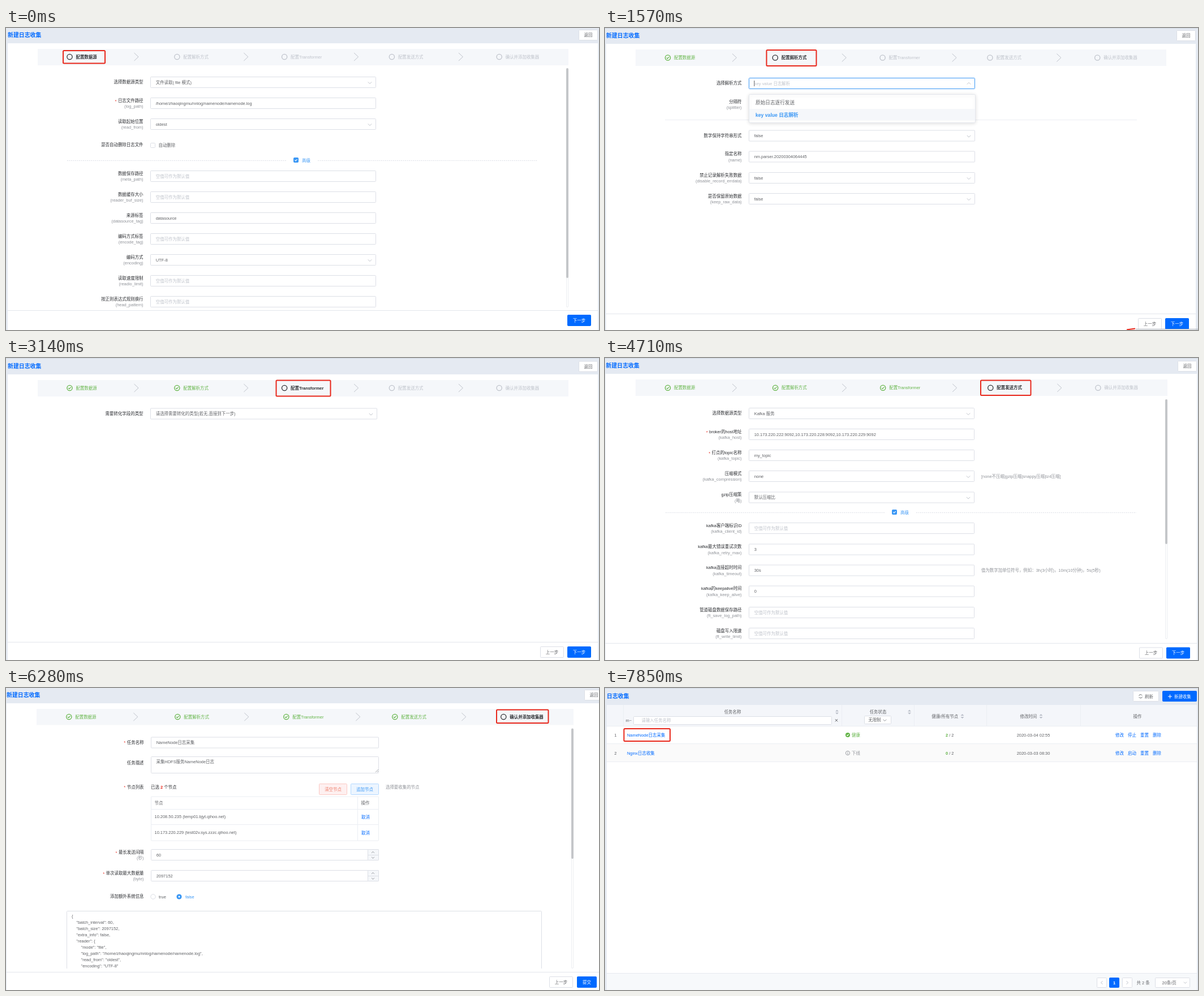
An HTML page with a canvas for the animation above (9.42 s loop, 1048 px wide and 534 px high).

```html
<!DOCTYPE html>
<html lang="zh-CN">
<head>
<meta charset="utf-8">
<title>日志收集</title>
<style>
html, body { margin: 0; width: 100%; height: 100%; overflow: hidden; background: #fff; }
canvas { display: block; width: 1048px; height: 534px; }
</style>
</head>
<body>
<canvas id="stage"></canvas>
<script>
const W = 1048, H = 534, HOLD = 1570;
const canvas = document.getElementById('stage');
const g = canvas.getContext('2d');
const dpr = window.devicePixelRatio || 1;
canvas.width = W * dpr;
canvas.height = H * dpr;

const FONT = '"Liberation Sans", "Noto Sans CJK SC", "Noto Sans CJK", sans-serif';
const C = {
  blue: '#006aff', sky: '#3a97f5', green: '#62b446', red: '#e8271b', ink: '#2b2d31',
  text: '#606266', sub: '#909399', faint: '#bfc3cb', line: '#dcdfe6', soft: '#ebeef3',
  bar: '#f5f7fa', head: '#e5eaf2', top: '#d3d9e3'
};
const EMPTY = '空值可作为默认值';

function text(s, x, y, color = C.text, o = {}) {
  const size = o.size || 7.45;
  g.font = `${o.bold ? 'bold ' : ''}${size}px ${FONT}`;
  g.textAlign = o.align || 'left';
  g.fillStyle = color;
  g.fillText(s, x, y + size * 0.36);
  return g.measureText(s).width;
}

function fill(x0, y0, x1, y1, color) {
  g.fillStyle = color;
  g.fillRect(x0, y0, x1 - x0, y1 - y0);
}

function box(x0, y0, x1, y1, stroke = C.line, bg = '#fff', r = 1) {
  g.beginPath();
  g.roundRect(x0 + 0.5, y0 + 0.5, x1 - x0 - 1, y1 - y0 - 1, r);
  g.fillStyle = bg;
  g.fill();
  g.strokeStyle = stroke;
  g.lineWidth = 1;
  g.stroke();
}

function path(points, color, width = 1) {
  g.beginPath();
  points.forEach(([x, y]) => g.lineTo(x, y));
  g.strokeStyle = color;
  g.lineWidth = width;
  g.stroke();
}

function circle(x, y, r, stroke, width = 1, bg) {
  g.beginPath();
  g.arc(x, y, r, 0, Math.PI * 2);
  if (bg) { g.fillStyle = bg; g.fill(); }
  if (stroke) { g.strokeStyle = stroke; g.lineWidth = width; g.stroke(); }
}

const rule = (x0, x1, y, color = C.soft) => fill(x0, y, x1, y + 1, color);
const tick = (x, y, color, k = 1) =>
  path([[x - 2.3 * k, y], [x - 0.6 * k, y + 1.7 * k], [x + 2.4 * k, y - 1.6 * k]], color, 1.1);
const caret = (x, y, dir = 1, w = 3.2, color = C.faint) =>
  path([[x - w, y - dir * w / 2], [x, y + dir * w / 2], [x + w, y - dir * w / 2]], color);
const arrow = (x, y, dir) => path([[x - dir * 1.5, y - 3], [x + dir * 1.5, y], [x - dir * 1.5, y + 3]], C.faint);

function frameBox(x0, y0, x1, y1) {
  g.beginPath();
  g.roundRect(x0, y0, x1 - x0, y1 - y0, 1.5);
  g.strokeStyle = C.red;
  g.lineWidth = 2;
  g.stroke();
}

function button(x0, y0, x1, y1, label, primary) {
  box(x0, y0, x1, y1, primary ? C.blue : C.line, primary ? C.blue : '#fff');
  text(label, (x0 + x1) / 2, (y0 + y1) / 2, primary ? '#fff' : C.text, { align: 'center' });
}

const STEPS = ['配置数据源', '配置解析方式', '配置Transformer', '配置发送方式', '确认并添加收集器'];
const GAPS = [118, 122, 127, 122];

function steps(active, x, y, pitch) {
  STEPS.forEach((name, i) => {
    const cx = x + i * pitch;
    const color = i < active ? C.green : i === active ? C.ink : C.faint;
    circle(cx, y, 4.6, color, 1.3);
    if (i < active) tick(cx, y, color);
    text(name, cx + 11, y, color, { bold: i === active });
    if (i < 4) {
      const ax = cx + GAPS[i];
      path([[ax - 4, y - 7], [ax + 3.5, y], [ax - 4, y + 7]], C.faint);
    }
  });
}

// Shared wizard page: header, step bar and footer buttons
function wizard(p) {
  fill(0, 0, W, H, C.head);
  if (p.edge) rule(0, W, 0, C.top);
  fill(p.left, p.top, p.right, H, '#fff');
  text('新建日志收集', p.title[0], p.title[1], C.blue, { size: 9.9, bold: true });
  const [bx, by] = p.back;
  button(bx, by, bx + 34, by + 19, '返回');
  fill(p.bar[0], p.bar[1], p.bar[2], p.bar[3], C.bar);
  steps(p.step, p.icon[0], p.icon[1], p.pitch || 189.8);
  frameBox(...p.mark);
  rule(p.left, p.right, p.foot, '#e3e6ec');
  const [nx, ny, nw] = p.next;
  if (p.prev) button(p.prev, ny, p.prev + 42, ny + 20, '上一步');
  button(nx, ny, nx + nw, ny + 20, nw < 40 ? '提交' : '下一步', true);
}

function label(x, y, name, sub, required) {
  const w = text(name, x, sub ? y - 4.8 : y - 0.6, C.ink, { align: 'right' });
  if (required) text('*', x - w - 2.5, y - (sub ? 4 : 0), C.red, { align: 'right' });
  if (sub) text(`(${sub})`, x, y + 5.6, C.sub, { align: 'right' });
}

// Row: [y, label, sub, value, flags]; flags: s select, * required
function rows(x0, x1, list) {
  for (const [y, name, sub, value, flags = ''] of list) {
    label(x0 - 12.5, y, name, sub, flags.includes('*'));
    box(x0, y - 10, x1, y + 10);
    text(value || EMPTY, x0 + 9.7, y, value ? C.text : C.faint);
    if (flags.includes('s')) caret(x1 - 11, y + 1);
  }
}

function advanced(x0, x1, mid, y) {
  g.setLineDash([2, 1.5]);
  path([[x0, y + 0.5], [mid - 27, y + 0.5]], C.line);
  path([[mid + 28, y + 0.5], [x1, y + 0.5]], C.line);
  g.setLineDash([]);
  box(mid - 15, y - 5, mid - 6, y + 4, C.sky, C.sky);
  tick(mid - 10.5, y - 0.5, '#fff', 0.9);
  text('高级', mid, y, C.sky);
}

function scrollbar(x, y0, y1, end) {
  box(x, y0, x + 4, end, '#eceef1', '#fff', 2);
  g.beginPath();
  g.roundRect(x, y0, 4, y1 - y0, 2);
  g.fillStyle = '#c4c6c9';
  g.fill();
}

function sourcePage() {
  wizard({ left: 3, right: 1046, top: 27, title: [3, 12], back: [1012, 3], bar: [56, 37, 994, 66],
    step: 0, icon: [112.5, 51], mark: [101, 40, 175, 62.5], foot: 499, next: [992, 507, 42] });
  rows(255, 654, [
    [96, '选择数据源类型', '', '文件读取( file 模式)', 's'],
    [133, '日志文件路径', 'log_path', '/home/zhaoqingmu/nnlog/namenode/namenode.log', '*'],
    [170, '读取起始位置', 'read_from', 'oldest', 's'],
    [262, '数据保存路径', 'meta_path'],
    [299, '数据缓存大小', 'reader_buf_size'],
    [336, '来源标签', 'datasource_tag', 'datasource'],
    [373, '编码方式标签', 'encode_tag'],
    [410, '编码方式', 'encoding', 'UTF-8', 's'],
    [447, '读取速度限制', 'readio_limit'],
    [484, '按正则表达式规则换行', 'head_pattern']
  ]);
  label(242.5, 207, '是否自动删除日志文件');
  box(255, 203, 264, 212);
  text('自动删除', 269.5, 207);
  advanced(108, 939, 523, 234);
  scrollbar(990, 71, 442, 494);
}

function parsePage() {
  wizard({ left: 2, right: 1044, top: 28, edge: true, title: [2, 13], back: [1010, 4], bar: [54, 38, 992, 67],
    step: 1, icon: [111, 52.5], mark: [285.5, 39, 373.5, 67], foot: 505, prev: 942, next: [990, 513, 42] });
  rule(106, 940, 162);
  rows(254, 654, [
    [190.5, '数字保持字符串形式', '', 'false', 's'],
    [227.5, '指定名称', 'name', 'nm.parser.20200304064445'],
    [265, '禁止记录解析失败数据', 'disable_record_errdata', 'false', 's'],
    [302, '是否保留原始数据', 'keep_raw_data', 'false', 's']
  ]);
  label(241.5, 98, '选择解析方式');
  label(241.5, 135, '分隔符', 'splitter');
  box(254, 88, 654, 108, C.sky);
  fill(263.5, 93, 264.3, 103, C.ink);
  text('key value 日志解析', 264, 98, C.faint);
  caret(643, 98, -1);
  g.save();
  g.shadowColor = 'rgba(0,0,0,.13)';
  g.shadowBlur = 6;
  g.shadowOffsetY = 1;
  box(254, 117, 655, 168, '#e4e7ed', '#fff', 2);
  g.restore();
  fill(255, 143, 654, 163.5, C.bar);
  text('原始日志逐行发送', 266, 132, C.text, { size: 8.65 });
  text('key value 日志解析', 266, 153.5, C.sky, { size: 8.65, bold: true });
  path([[922, 533.5], [937, 531.5]], C.red, 2);
  rule(938, W, 532, '#aab0ba');
}

function transformPage() {
  wizard({ left: 3, right: 1046, top: 29, edge: true, title: [3, 14], back: [1012, 5.5], bar: [56, 39, 994, 68],
    step: 2, icon: [112.5, 53], mark: [477.5, 39.5, 573.5, 67.5], foot: 502, prev: 944, next: [992, 510, 42] });
  rows(255, 656, [[98.5, '需要转化字段的类型', '', '请选择需要转化的类型(若无,直接到下一步)', 's']]);
}

function sendPage() {
  wizard({ left: 1, right: 1046, top: 28, edge: true, title: [1.5, 13], back: [1012, 5], bar: [54, 38, 994, 67],
    step: 3, icon: [111, 52.8], pitch: 190.1, mark: [664, 39.5, 752.5, 66], foot: 504, prev: 944, next: [992, 511.5, 42] });
  rows(254, 653, [
    [98, '选择数据源类型', '', 'Kafka 服务', 's'],
    [135, 'broker的host地址', 'kafka_host', '10.173.220.222:9092,10.173.220.228:9092,10.173.220.229:9092', '*'],
    [172, '打点的topic名称', 'kafka_topic', 'my_topic', '*'],
    [209, '压缩模式', 'kafka_compression', 'none', 's'],
    [246.5, 'gzip压缩策', '略', '默认压缩比', 's'],
    [301, 'kafka客户端标识ID', 'kafka_client_id'],
    [338.5, 'kafka最大错误重试次数', 'kafka_retry_max', '3'],
    [375.5, 'kafka连接超时时间', 'kafka_timeout', '30s'],
    [412.5, 'kafka的keepalive时间', 'kafka_keep_alive', '0'],
    [450, '管道磁盘数据保存路径', 'ft_save_log_path'],
    [487, '磁盘写入限速', 'ft_write_limit']
  ]);
  text('[none不压缩|gzip压缩|snappy压缩|lz4压缩]', 665, 209, C.sub);
  text('值为数字加单位符号，例如：3h(3小时)，10m(10分钟)，5s(5秒)', 665, 375, C.sub);
  advanced(107, 939, 522, 273);
  scrollbar(990, 73, 329, 497);
}

const CONFIG = [
  '{',
  '    "batch_interval": 60,',
  '    "batch_size": 2097152,',
  '    "extra_info": false,',
  '    "reader": {',
  '        "mode": "file",',
  '        "log_path": "/home/zhaoqingmu/nnlog/namenode/namenode.log",',
  '        "read_from": "oldest",',
  '        "encoding": "UTF-8"'
];

function confirmPage() {
  wizard({ left: 1, right: W, top: 27, title: [1, 12], back: [1022, 3], bar: [54, 37, 1003, 65.5],
    step: 4, icon: [111.3, 51], pitch: 192, mark: [867, 38.5, 958.5, 62], foot: 502, prev: 960, next: [1009, 510, 35] });
  rows(256, 659, [
    [96.5, '任务名称', '', 'NameNode日志采集', '*'],
    [295, '最长发送间隔', '秒', '60', '*'],
    [332, '单次读取最大数据量', 'byte', '2097152', '*']
  ]);
  for (const y of [295, 332]) {
    box(639, y - 10, 659, y + 10, C.line, C.bar);
    rule(639, 659, y, C.line);
    caret(648.5, y - 4.5, -1, 2.4, C.sub);
    caret(648.5, y + 5, 1, 2.4, C.sub);
  }
  label(243.5, 133, '任务描述');
  box(256, 121, 659, 151);
  text('采集HDFS服务NameNode日志', 265.5, 130.5);
  path([[653, 149], [658, 144]], C.sub, 0.8);
  path([[656, 149], [658, 147]], C.sub, 0.8);

  label(243.5, 175.5, '节点列表', '', true);
  let x = 256;
  x += text('已选 ', x, 175, C.ink);
  x += text('2', x, 175, C.red, { bold: true });
  text(' 个节点', x, 175, C.ink);
  box(553, 169, 603, 189, '#fbc9c4', '#fef0f0');
  text('清空节点', 578, 179, '#ee7f6b', { align: 'center' });
  box(609, 169, 659, 189, '#b3d8ff', '#ecf5ff');
  text('追加节点', 634, 179, C.sky, { align: 'center' });
  text('选择要收集的节点', 671, 175, C.sub);

  box(256, 191.5, 659, 270.5, C.soft);
  rule(256, 659, 214);
  rule(256, 659, 241);
  fill(621, 192, 622, 270, C.soft);
  text('节点', 262.5, 203);
  text('操作', 627.5, 203);
  text('10.208.50.235 (temp01.bjyt.qihoo.net)', 262.5, 227.5);
  text('10.173.220.229 (test02v.sys.zzzc.qihoo.net)', 262.5, 255.5);
  text('取消', 628, 228, C.blue);
  text('取消', 628, 256, C.blue);

  label(243.5, 369, '添加额外系统信息');
  circle(260, 369, 4.2, C.line);
  text('true', 270, 369.5);
  circle(306, 369, 4.6, null, 0, C.sky);
  circle(306, 369, 1.5, null, 0, '#fff');
  text('false', 317, 369.5, C.sky);

  g.save();
  g.beginPath();
  g.rect(0, 390, 990, 106);
  g.clip();
  box(107, 394, 947, 520);
  CONFIG.forEach((s, i) => text(s, 116, 403 + i * 11.1));
  g.restore();
  scrollbar(999, 71.5, 302, 496);
}

function sorter(x, y) {
  g.fillStyle = '#b9bec8';
  for (const d of [-1, 1]) {
    g.beginPath();
    g.moveTo(x - 3, y + d);
    g.lineTo(x + 3, y + d);
    g.lineTo(x, y + d * 4);
    g.fill();
  }
}

function taskRow(y, n, name, time, live) {
  const mid = { align: 'center' };
  text(n, 18.5, y, C.text, mid);
  text(name, 39, y, C.blue);
  if (live) {
    circle(429, y, 4, null, 0, C.green);
    tick(429, y, '#fff', 0.8);
  } else {
    circle(429, y, 3.6, C.sub, 0.9);
    fill(428.5, y - 2, 429.5, y - 1, C.sub);
    fill(428.5, y - 0.3, 429.5, y + 2.2, C.sub);
  }
  text(live ? '健康' : '下线', 436, y + 0.4, live ? C.green : C.sub);
  const w = text(live ? '2' : '0', 602, y, C.green, { bold: true });
  text(' / 2', 602 + w, y);
  text(time, 757, y, C.text, mid);
  ['修改', live ? '停止' : '启动', '重置', '删除'].forEach((s, i) => text(s, 902 + i * 22, y, C.blue));
}

function listPage() {
  fill(0, 0, W, H, C.head);
  rule(0, W, 0, C.top);
  text('日志收集', 3, 14, C.blue, { size: 9.9, bold: true });
  box(933, 5, 979, 24);
  for (const a of [0.3, Math.PI + 0.3]) {
    g.beginPath();
    g.arc(946.5, 14.7, 3.1, a, a + 2.4);
    g.strokeStyle = C.text;
    g.lineWidth = 0.9;
    g.stroke();
  }
  text('刷新', 954, 15);
  box(985, 5, 1046, 24, C.blue, C.blue);
  path([[995, 15], [1002, 15]], '#fff');
  path([[998.5, 11.5], [998.5, 18.5]], '#fff');
  text('新建收集', 1006, 15, '#fff');

  fill(3, 30, 1046, H, '#fff');
  fill(3, 30, 1046, 67, '#f4f6fa');
  for (const x of [32, 418, 546, 674, 840]) fill(x, 30, x + 1, 67, C.soft);
  fill(3, 99, 1046, 131, '#fafafa');
  for (const y of [67, 98, 130]) rule(3, 1046, y);

  const mid = { align: 'center' };
  text('任务名称', 225.5, 42.5, C.text, mid);
  text('任务状态', 482.5, 42, C.text, mid);
  text('健康/所有节点', 577.5, 50);
  text('修改时间', 733.5, 50);
  text('操作', 941, 50, C.text, mid);
  sorter(410, 42.5);
  sorter(538, 42.5);
  sorter(631.5, 50);
  sorter(770.5, 50);
  text('m~', 36.5, 57.5);
  box(50, 50, 401, 65);
  text('请输入任务名称', 64.5, 57.5, C.faint);
  path([[406.8, 55], [411.2, 59.4]], C.text);
  path([[411.2, 55], [406.8, 59.4]], C.text);
  box(458, 49, 506, 64);
  text('无限制', 465.5, 56.7);
  caret(494.5, 57, 1, 2.8, C.sub);

  taskRow(83, '1', 'NameNode日志采集', '2020-03-04 02:55', true);
  taskRow(115, '2', 'Nginx日志收集', '2020-03-03 08:30', false);
  frameBox(33.5, 72, 115, 94);

  fill(3, 504, 1046, H, '#f7f9fb');
  rule(3, 1046, 504, '#e6e9ef');
  box(869, 512, 887, 530);
  arrow(878, 521, -1);
  box(891, 512, 909, 530, C.blue, C.blue);
  text('1', 900, 521, '#fff', { align: 'center', bold: true });
  box(914, 512, 932, 530);
  arrow(923, 521, 1);
  text('共 2 条', 939.5, 521);
  box(972, 512, 1034, 530);
  text('20条/页', 984.5, 521);
  caret(1025.5, 521, 1, 2.6);
}

const PAGES = [sourcePage, parsePage, transformPage, sendPage, confirmPage, listPage];
const start = performance.now();

function render() {
  const t = Math.max(0, performance.now() - start);
  g.setTransform(dpr, 0, 0, dpr, 0, 0);
  PAGES[Math.floor(t / HOLD) % PAGES.length]();
  requestAnimationFrame(render);
}
render();
</script>
</body>
</html>
```
